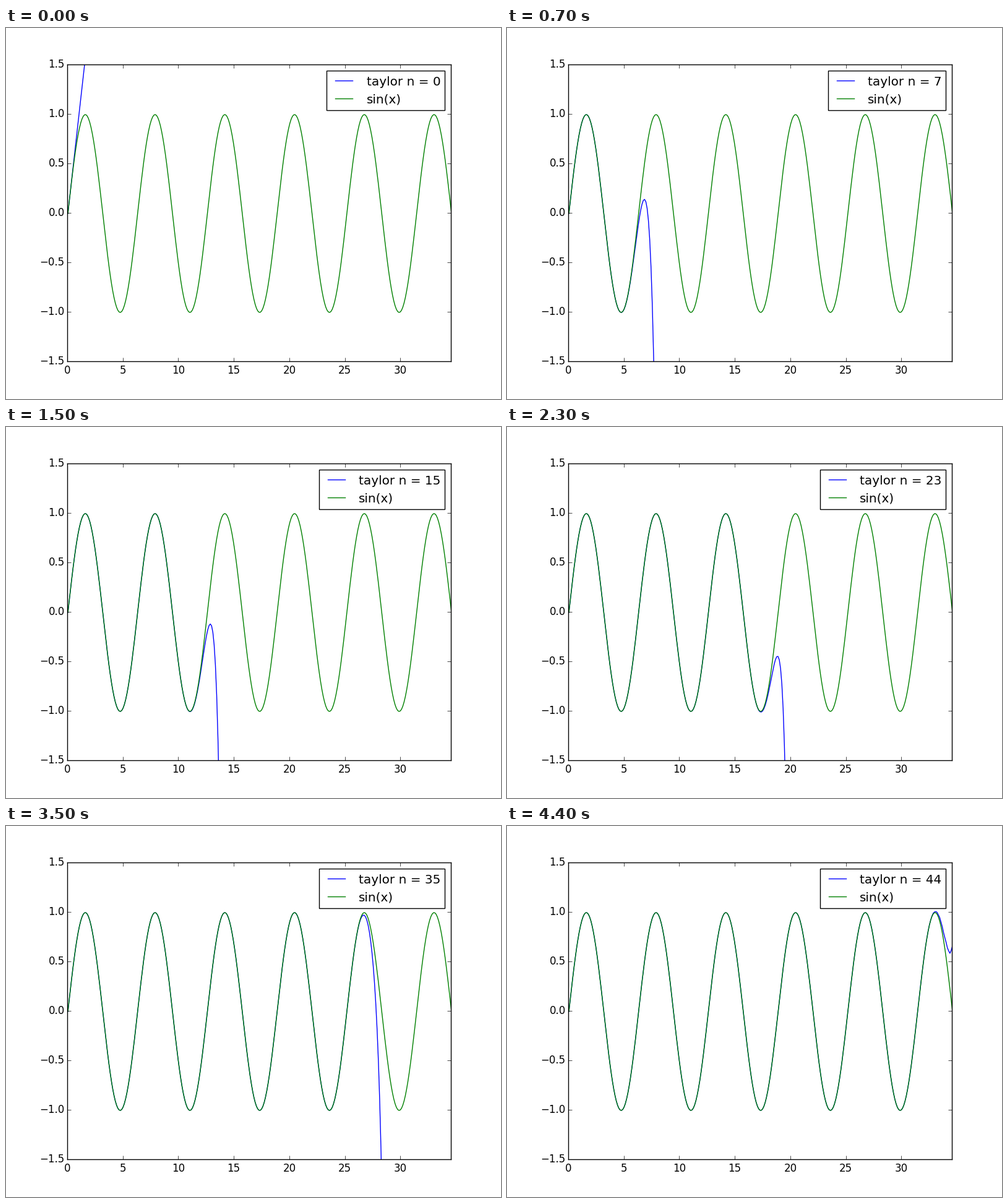
Recreate the animation shown at these times as a matplotlib script. Size 800x600 px, loop 4.5 s.

```python
from math import factorial

import matplotlib.pyplot as plt
import numpy as np
from matplotlib.animation import FuncAnimation
from matplotlib.transforms import Affine2D

ORDERS = 45
X_MAX = 11 * np.pi
WIDTH, HEIGHT, DPI = 800, 600, 100

plt.style.use("classic")
plt.rcParams.update({
    "figure.dpi": DPI,
    "figure.facecolor": "white",
    "font.family": "DejaVu Sans",
    "ytick.major.pad": 3,
    "legend.handletextpad": 0.74,
})


def taylor(x, n):
    """Sine series about zero, up to the term of degree 2n + 1."""
    total = np.zeros_like(x)
    for k in range(n + 1):
        p = 2 * k + 1
        total += (-1) ** k * x**p / float(factorial(p))
    return total


x = np.linspace(0, X_MAX, 300)

fig = plt.figure(figsize=(WIDTH / DPI, HEIGHT / DPI))
ax = fig.add_axes([99 / WIDTH, 61 / HEIGHT, 620 / WIDTH, 480 / HEIGHT])
ax.set_xlim(0, X_MAX)
ax.set_ylim(-1.5, 1.5)

# The frame sits one pixel up and left of the curves.
curve_space = ax.transData + Affine2D().translate(1, -1)
approx, = ax.plot(x, taylor(x, 0), "b", label="taylor n = 0",
                  transform=curve_space)
ax.plot(x, np.sin(x), "g", label="sin(x)", transform=curve_space)
ax.set_xlim(0, X_MAX)
ax.set_ylim(-1.5, 1.5)

labels = ax.legend(loc="upper right").get_texts()
for text in labels:
    text.set_position((1.5, -1))


def update(n):
    approx.set_ydata(taylor(x, n))
    labels[0].set_text(f"taylor n = {n}")
    return approx, labels[0]


anim = FuncAnimation(fig, update, frames=ORDERS, interval=100,
                     repeat=True, repeat_delay=0, blit=False)
plt.show()
```
